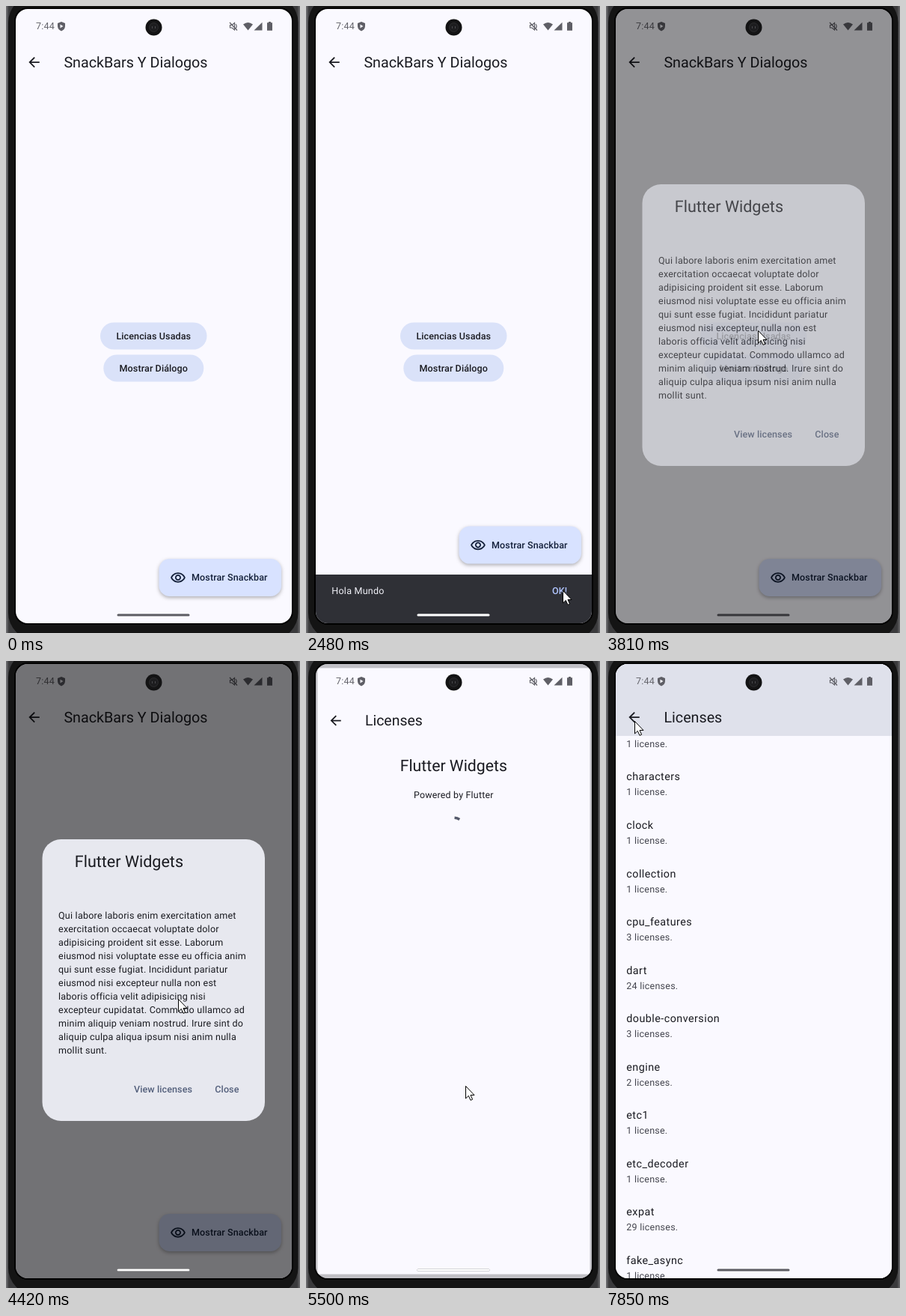
Animation of 393 by 837 pixels, one loop 7990 ms. Source, as an HTML page:

```html
<!DOCTYPE html>
<html lang="es">
<head>
<meta charset="utf-8">
<title>SnackBars Y Dialogos</title>
<style>
  html, body { margin: 0; width: 100%; height: 100%; overflow: hidden; background: #151515; }
  svg { display: block; width: 393px; height: 837px; }
  text { font-family: Roboto, sans-serif; text-rendering: geometricPrecision; white-space: pre; fill: #1a1b21; }
  .bar { font-size: 19.73px; }
  .head { font-size: 21.53px; }
  .body { font-size: 12.56px; letter-spacing: .224px; }
  .item { font-size: 14.35px; letter-spacing: .45px; }
  .label { font-size: 12.56px; font-weight: 500; letter-spacing: .09px; }
  .mid { text-anchor: middle; }
  .sub { fill: #45464f; }
  .link { fill: #535f7b; }
  #fab { filter: drop-shadow(0 2.5px 2.5px rgba(0, 0, 0, .3)); }
</style>
</head>
<body>
<svg viewBox="0 0 393 837">
  <defs>
    <clipPath id="screen"><rect x="13" y="4" width="369" height="820" rx="16"/></clipPath>
    <clipPath id="listArea"><rect x="13" y="100" width="369" height="724"/></clipPath>
    <linearGradient id="edge">
      <stop offset="0" stop-color="#77777a"/>
      <stop offset=".01" stop-color="#3a3a3c"/>
      <stop offset=".99" stop-color="#3a3a3c"/>
      <stop offset="1" stop-color="#6a6a6d"/>
    </linearGradient>
    <path id="back" d="M20 11H7.83l5.59-5.59L12 4l-8 8 8 8 1.41-1.41L7.83 13H20z" transform="translate(26.8 64.3) scale(.897)" fill="#1a1b21"/>
    <g id="status" fill="#5f5f66">
      <text x="40" y="31.3" font-size="12.6" style="fill:#66666d;letter-spacing:.2px">7:44</text>
      <path d="M74 21l5 2v4c0 3-2 5.300-5 6.400c-3-1.100-5-3.400-5-6.400v-4z"/>
      <path d="M72.500 24.500l4 2.500l-4 2.500z" fill="#faf9ff"/>
      <path d="M299.500 25.500h2.500l3.500-3v9.500l-3.500-3h-2.500zM307 24q2.400 3 0 6" fill="none" stroke="#5f5f66" stroke-width="1.200"/>
      <path d="M299 22l10 10.500" stroke="#5f5f66" stroke-width="1.300"/>
      <path d="M317 24.500q6.500-5 13 0l-6.500 8z"/>
      <path d="M342.500 21.800v10.700h-11z"/>
      <path d="M351 21h3v1.200h2v10.500h-7v-10.500h2z"/>
      <rect x="148.500" y="811.500" width="97" height="3" rx="1.500" fill="#5d5d63"/>
    </g>
  </defs>

  <rect width="393" height="837" fill="url(#edge)"/>
  <rect x="3" y="-14" width="387.500" height="860" rx="36" fill="#141414"/>
  <rect x="11" y="2" width="373" height="824" rx="18" fill="#000"/>

  <g clip-path="url(#screen)">
    <rect x="13" y="4" width="369" height="820" fill="#faf9ff"/>
    <use href="#back"/>
    <text class="bar" x="77.400" y="81.700">SnackBars Y Dialogos</text>
    <rect x="126" y="422.500" width="142.500" height="36" rx="18" fill="#dae2f9"/>
    <text class="label mid" x="197.300" y="445">Licencias Usadas</text>
    <rect x="130.300" y="465.500" width="134" height="36" rx="18" fill="#dae2f9"/>
    <text class="label mid" x="197.300" y="488">Mostrar Diálogo</text>

    <g id="snack">
      <rect x="13" y="759" width="369" height="70" fill="#2f3036"/>
      <g id="snackText">
        <text class="body" x="34.300" y="785" style="fill:#f0f0f7">Hola Mundo</text>
        <text class="label" x="329" y="785" style="fill:#b1c5ff">OK!</text>
      </g>
    </g>
    <g id="fab">
      <rect x="204.500" y="738" width="163.500" height="50" rx="14.350" fill="#d8e2ff"/>
      <path transform="translate(219.200 752.700) scale(.897)" fill="#14203a" d="M12 6c3.790 0 7.170 2.130 8.820 5.500C19.170 14.870 15.790 17 12 17s-7.170-2.130-8.820-5.500C4.830 8.130 8.210 6 12 6m0-2C7 4 2.730 7.110 1 11.500 2.730 15.890 7 19 12 19s9.270-3.110 11-7.500C21.270 7.110 17 4 12 4zm0 5c1.380 0 2.500 1.120 2.500 2.500S13.380 14 12 14s-2.500-1.120-2.500-2.500S10.620 9 12 9m0-2c-2.480 0-4.500 2.020-4.500 4.500S9.520 16 12 16s4.500-2.020 4.500-4.500S14.480 7 12 7z"/>
      <text class="label" x="248" y="767.300" style="fill:#14203a">Mostrar Snackbar</text>
    </g>
    <use href="#status"/>

    <rect id="barrier" x="13" y="4" width="369" height="820"/>
    <g id="dialog">
      <rect x="48.500" y="238" width="297.500" height="376" rx="25" fill="#e7e8ef"/>
      <text class="head" x="91.800" y="274.500">Flutter Widgets</text>
      <g id="lorem"></g>
      <rect id="press" x="160" y="553" width="100" height="36" rx="18" fill="#535f7b"/>
      <text class="label link" x="171" y="575.700">View licenses</text>
      <text class="label link" x="279.300" y="575.700">Close</text>
    </g>

    <rect id="veil" x="13" y="4" width="369" height="820" fill="#c1c0c5"/>
    <g id="page">
      <rect x="13" y="4" width="369" height="820" fill="#faf9ff"/>
      <g clip-path="url(#listArea)">
        <g id="list">
          <text class="head mid" x="197.300" y="143.500">Flutter Widgets</text>
          <text class="body mid" x="197.300" y="180.300">Powered by Flutter</text>
          <g id="rows"></g>
        </g>
      </g>
      <circle id="spinner" cx="197.500" cy="221" r="14.500" fill="none" stroke="#555a6b" stroke-width="3.600"/>
      <rect id="appBar" x="13" y="4" width="369" height="96" fill="#dfe1eb"/>
      <use href="#back"/>
      <text class="bar" x="77.400" y="81.700">Licenses</text>
    </g>
    <use id="pageStatus" href="#status"/>
    <rect id="pill" x="148.500" y="811.500" width="97" height="3" rx="1.500" fill="#fff"/>
  </g>

  <circle cx="197.500" cy="28.500" r="11" fill="#131314"/>
  <circle cx="197.500" cy="28.500" r="6" fill="#1d1d1f" stroke="#2c2c2e"/>
  <path d="M195.500 27v3M199.500 27v3" stroke="#48484c"/>
  <path id="cursor" d="M.5.500v16.500l3.800-3.600l2.700 6l2.600-1.200l-2.600-5.700h5z" fill="#fff" stroke="#000"/>
</svg>

<script>
const LOOP = 7990;
const ROW = 64.55;
const $ = id => document.getElementById(id);
const clamp = v => Math.max(0, Math.min(1, v));
const ramp = (t, from, to) => clamp((t - from) / (to - from));
const smooth = p => p * p * (3 - 2 * p);
const easeOut = p => 1 - (1 - p) ** 2;
const pulse = (t, on, off, d) => ramp(t, on, on + d) - ramp(t, off, off + d);
const fade = (id, v) => $(id).setAttribute('opacity', v.toFixed(3));
const move = (id, x, y) => $(id).setAttribute('transform', `translate(${x.toFixed(2)} ${y.toFixed(2)})`);

function addText(parent, cls, x, y, str) {
  const el = document.createElementNS('http://www.w3.org/2000/svg', 'text');
  el.setAttribute('class', cls);
  el.setAttribute('x', x);
  el.setAttribute('y', y);
  el.textContent = str;
  parent.appendChild(el);
}

const lorem = `Qui labore laboris enim exercitation amet
exercitation occaecat voluptate dolor
adipisicing proident sit esse. Laborum
eiusmod nisi voluptate esse eu officia anim
qui sunt esse fugiat. Incididunt pariatur
eiusmod nisi excepteur nulla non est
laboris officia velit adipisicing nisi
excepteur cupidatat. Commodo ullamco ad
minim aliquip veniam nostrud. Irure sint do
aliquip culpa aliqua ipsum nisi anim nulla
mollit sunt.`;
lorem.split('\n').forEach((s, i) => addText($('lorem'), 'body', 70, 344.2 + i * 17.94, s));

const packages = 'abseil-cpp:2 accessibility:15 angle:32 animate_do:1 async:1 boolean_selector:1 ' +
  'boringssl:1 brotli:10 ceval:1 characters:1 clock:1 collection:1 cpu_features:3 dart:24 ' +
  'double-conversion:3 engine:2 etc1:1 etc_decoder:1 expat:29 fake_async:1';
packages.split(' ').forEach((entry, i) => {
  const [name, n] = entry.split(':');
  addText($('rows'), 'item', 27.3, 234 + i * ROW, name);
  addText($('rows'), 'body sub', 27.3, 254 + i * ROW, `${n} license${n > 1 ? 's' : ''}.`);
});

// time, x, y of the pointer tip
const path = [
  [460, 346, 825], [820, 185, 423], [930, 195, 445], [1190, 262, 678], [1400, 280, 762],
  [2300, 282, 764], [2410, 300, 760], [2480, 343, 780], [2660, 343, 781], [2870, 304, 745],
  [3520, 203, 420], [3670, 203, 433], [4200, 203, 433], [4420, 230, 451], [4560, 238, 500],
  [4720, 226, 586], [4820, 213, 567], [5770, 213, 567], [6290, 178, 171], [6420, 172, 190],
  [6770, 158, 321], [7180, 158, 321], [7510, 40, 94], [7600, 40, 94], [7850, 38, 80]
];

function pointer(t) {
  const i = path.findIndex(k => k[0] > t);
  if (i < 0) return path[path.length - 1].slice(1);
  const a = path[Math.max(0, i - 1)], b = path[i];
  const p = smooth(ramp(t, a[0], b[0]));
  return [a[1] + (b[1] - a[1]) * p, a[2] + (b[2] - a[2]) * p];
}

function draw(t) {
  // snackbar pushes the floating button up
  const rise = smooth(easeOut(ramp(t, 1500, 1750))) - smooth(ramp(t, 2600, 2850));
  const top = 824 - 65 * rise;
  move('snack', 0, top - 759);
  fade('snackText', ramp(rise, .4, 1));
  move('fab', 0, Math.min(802.4, top) - 802.4);

  const d = ramp(t, 3740, 3890);
  fade('barrier', .54 * (1 - (1 - d) ** 2.3));
  fade('dialog', 1 - (1 - d) ** 1.6);
  fade('press', .12 * pulse(t, 4960, 5290, 150));

  // zoom transition into the licenses page
  const z = ramp(t, 5290, 5590);
  const s = .85 + .15 * easeOut(z);
  fade('veil', ramp(z, 0, .5));
  fade('page', ramp(z, .1, .35));
  fade('pageStatus', ramp(z, .1, .35));
  $('page').setAttribute('transform', `translate(197.5 414) scale(${s.toFixed(4)}) translate(-197.5 -414)`);

  const loaded = t >= 5800;
  fade('spinner', t >= 5480 && !loaded ? 1 : 0);
  const spin = Math.max(0, t - 5480);
  $('spinner').setAttribute('stroke-dasharray', `${(4 + spin * .15).toFixed(1)} 200`);
  $('spinner').setAttribute('transform', `rotate(${(-90 + spin * .2).toFixed(1)} 197.5 221)`);
  fade('rows', loaded ? 1 : 0);

  // wheel scrolling jumps
  move('list', 0, t < 6970 ? 0 : t < 7040 ? -330 : -655.5);
  fade('appBar', ramp(t, 6940, 7040));

  fade('pill', pulse(t, 1600, 2950, 120) + pulse(t, 3960, 5900, 100));

  fade('cursor', t >= 460 ? 1 : 0);
  move('cursor', ...pointer(t));
}

const start = performance.now();
function tick() {
  draw((performance.now() - start) % LOOP);
  requestAnimationFrame(tick);
}
tick();
</script>
</body>
</html>
```
